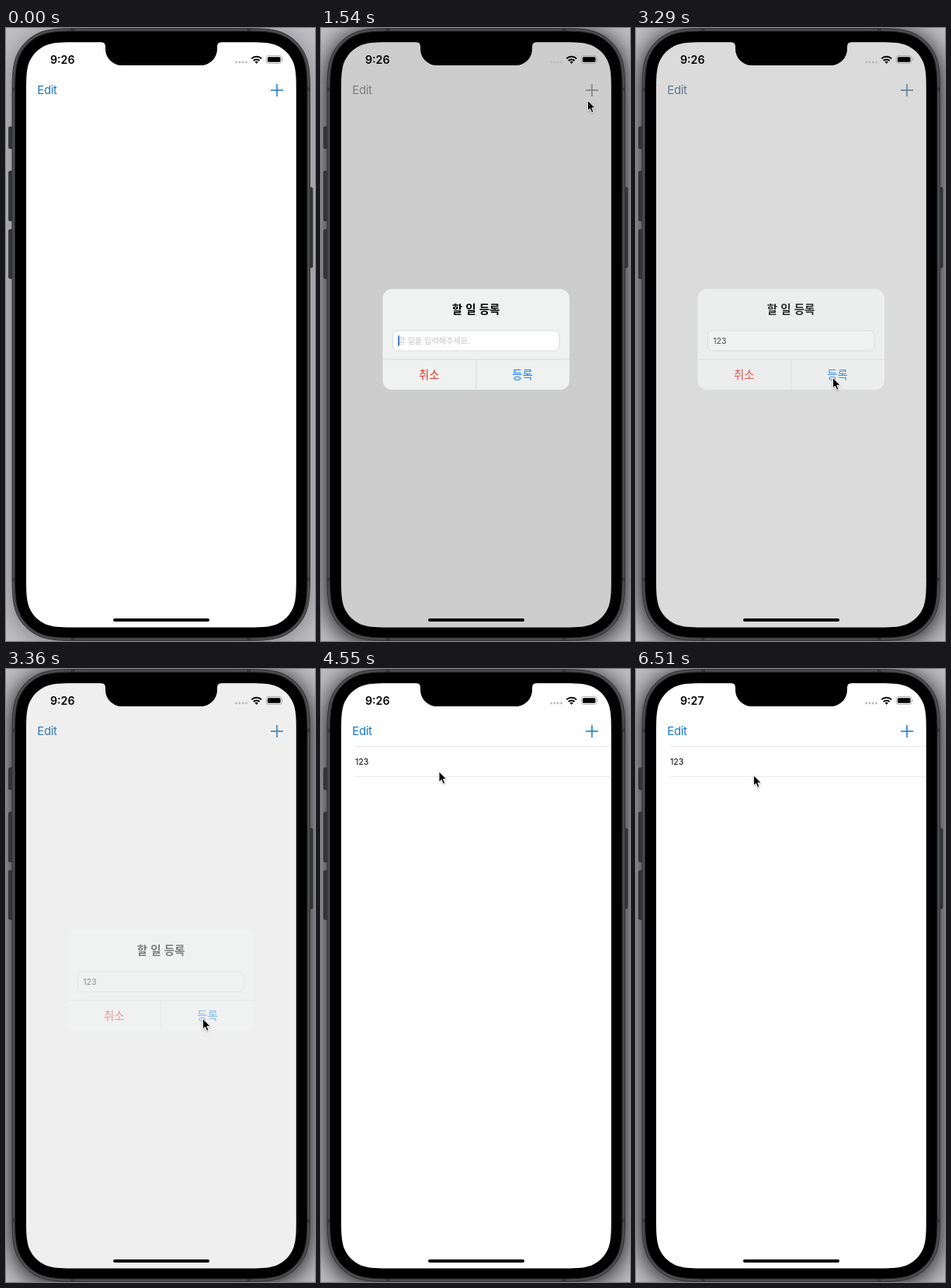
Animation of 398x788 px, one loop 6.58 s. Source, as an HTML page:

```html
<!DOCTYPE html>
<html lang="ko">
<head>
<meta charset="utf-8">
<title>To-do list</title>
<style>
  html, body { margin: 0; height: 100%; overflow: hidden; }
  svg { display: block; width: 398px; height: 788px; background: #c0c0c4; }
  text { font-family: Inter, "Noto Sans CJK KR", "Noto Sans CJK", sans-serif; }
  .ko { font-family: "Noto Sans CJK KR", "Noto Sans CJK", sans-serif; font-size: 14.4px; text-anchor: middle; }
  #shadow { filter: blur(16px); }
  #title { font-size: 14.6px; font-weight: 700; }
  #hint { font-size: 10.2px; text-anchor: start; fill: #c2c3c5; }
  #cursor { filter: drop-shadow(0 1px .8px #0004); }
</style>
</head>
<body>
<svg id="stage" viewBox="0 0 398 788">
  <!-- Device -->
  <path id="shadow"/>
  <g fill="#343537" stroke="#222325" stroke-width=".7">
    <rect x="3.5" y="127" width="6" height="28" rx="1.5"/>
    <rect x="3.5" y="184" width="6" height="64" rx="1.5"/>
    <rect x="3.5" y="259" width="6" height="63" rx="1.5"/>
    <rect x="389" y="205" width="6" height="103" rx="1.5"/>
  </g>
  <path id="body" fill="#4b4c4e" stroke="#303133"/>
  <path d="M8 79h5M387 79h5M8 709h5M387 709h5M86 1v4M313 1v4M86 783v4M313 783v4" stroke="#353638" stroke-width="5"/>
  <path id="bezel" stroke="#2b2c2e"/>
  <path id="screen" fill="#fff"/>
  <path id="dim"/>
  <path d="M122 18Q128 18 128 24V27A21 21 0 0 0 149 48H251A21 21 0 0 0 272 27V24Q272 18 278 18Z"/>
  <rect x="138" y="759" width="124" height="4" rx="2"/>

  <!-- Status bar -->
  <text id="clock" x="57" y="45.7" font-size="14.2" font-weight="600"></text>
  <path d="M296.6 44H309.6" stroke="#b9b9bc" stroke-width="2.8" stroke-linecap="round" stroke-dasharray="0 4.3"/>
  <path d="M316.3 39.4A9 9 0 0 1 329.1 39.4M318.8 42A5.5 5.5 0 0 1 326.6 42" fill="none" stroke="#000" stroke-width="2"/>
  <path d="M322.7 45.9L320.5 43.6Q322.7 41.9 324.9 43.6Z"/>
  <rect x="335.3" y="35.6" width="19.8" height="9.8" rx="2.8" fill="none" stroke="#a4a4a6" stroke-width=".9"/>
  <rect x="336.9" y="37.2" width="16.6" height="6.6" rx="1.5"/>
  <path d="M356.2 39.1Q357.8 40.5 356.2 41.9Z" fill="#a4a4a6"/>

  <!-- List -->
  <text id="edit" x="40.2" y="85.4" font-size="14.9" letter-spacing="-.25">Edit</text>
  <path id="plus" d="M341 80H357M349 72V88" stroke-width="1.5"/>
  <rect id="highlight" x="26" y="99" width="348" height="39.5" fill="#d1d1d5"/>
  <g id="row">
    <path d="M44 99.5H373.5M44 138.5H373.5" stroke="#e9e9eb"/>
    <text x="44" y="123.2" font-size="10.7">123</text>
  </g>
  <path id="check" d="M339.7 119.9L343.6 124.5L351.2 113.8" fill="none" stroke="#1878c9" stroke-width="1.7" stroke-linecap="round" stroke-linejoin="round"/>

  <!-- Alert -->
  <g id="alert">
    <rect id="card" x="79.5" y="335.5" width="240.5" height="129.5" rx="12" fill="#f0f2f2"/>
    <rect id="field" x="92.5" y="389" width="214.5" height="26" rx="6" stroke="#d5d8d8" stroke-width=".9"/>
    <g id="content">
      <path d="M79.5 426H320M199.8 426V465" stroke="#d9dbdb"/>
      <text class="ko" id="title" x="199.6" y="367.2">할 일 등록</text>
      <text class="ko" id="hint" x="99.2" y="405.8">할 일을 입력해주세요.</text>
      <text id="typed" x="99.2" y="406" font-size="10.7" fill="#222"></text>
      <text class="ko" x="139.2" y="451" fill="#e0362c">취소</text>
      <text class="ko" x="259.5" y="451" fill="#167af2">등록</text>
      <rect id="caret" y="395.3" width="1.8" height="13.4" rx=".6" fill="#4470d0"/>
    </g>
  </g>

  <path id="cursor" d="M0 0V13.6L3.1 10.8L5.4 16L7.7 15L5.5 9.9H9.8Z" stroke="#fff"/>
</svg>
<script>
const LOOP = 6580, STEP = 70;
const el = Object.fromEntries([...document.querySelectorAll('[id]')].map(e => [e.id, e]));
const set = (id, attrs) => { for (const k in attrs) el[id].setAttribute(k, attrs[k]); };
const show = (id, alpha) => set(id, { opacity: +alpha });
const ramp = (t, from, to) => Math.min(1, Math.max(0, (t - from) / (to - from)));
const smooth = p => p * p * (3 - 2 * p);
const mix = (a, b, p) => a + (b - a) * p;

// Rectangle with continuous-curvature corners
function squircle(x, y, right, bottom, r) {
  const corner = [[1.529, 0], [1.088, 0], [.868, 0], [.631, .075], [.373, .169],
    [.169, .373], [.075, .631], [0, .868], [0, 1.088], [0, 1.529]];
  const place = (flipX, flipY, points) => points.map(([u, v]) =>
    `${flipX ? right - u * r : x + u * r} ${flipY ? bottom - v * r : y + v * r}`);
  const back = [...corner].reverse();
  const corners = [place(1, 0, corner), place(1, 1, back), place(0, 1, corner), place(0, 0, back)];
  return 'M' + corners.map(([first, ...rest]) => `${first}C${rest.join(' ')}`).join('L') + 'Z';
}

set('shadow', { d: squircle(8, 4, 391.5, 791, 60) });
set('body', { d: squircle(8, .5, 391.5, 787.5, 60) });
set('bezel', { d: squircle(11.5, 4, 388, 784, 56.5) });
for (const id of ['screen', 'dim']) set(id, { d: squircle(26, 18.3, 373.8, 770.5, 43.3) });

// Each move: start, end, x, y, sideways bend
const moves = [
  [70, 790, 348.5, 78.5, 85], [1330, 1400, 343, 92.5], [1540, 2100, 245, 452],
  [2870, 3010, 253, 449], [3990, 4620, 148, 120], [5740, 5810, 147, 122.5], [6370, 6510, 151, 136]
];
function pointer(t) {
  let x = 214, y = 765;
  for (const [start, end, toX, toY, bend = 0] of moves) {
    const p = smooth(ramp(t, start, end));
    x = mix(x, toX, p) + bend * Math.sin(Math.PI * p);
    y = mix(y, toY, p);
  }
  return `${x + .4} ${y + .4}`;
}

const blue = [24, 120, 201], gray = [122, 123, 125];
const tapGlow = (t, start, end) => t < start ? 0 : 1 - ramp(t, start + STEP, end);

function draw(t) {
  show('shadow', t < 1050 ? .35 : 1);
  el.clock.textContent = t < 5390 ? '9:26' : '9:27';

  const enter = ramp(t, 1170, 1480), leave = ramp(t, 3250, 3460);
  const alpha = enter * (1 - leave), leaving = leave > 0;
  const dim = smooth(enter) * (1 - leave) ** 1.5;
  const tint = `rgb(${blue.map((c, i) => Math.round(mix(c, gray[i], dim)))})`;
  show('dim', dim * .196);
  set('edit', { fill: tint });
  set('plus', { stroke: tint });
  show('plus', t < 1050 ? 1 : mix(.3, 1, ramp(t, 1170, 1400)));

  const scale = 1 + .2 * (1 - enter) ** 2;
  set('alert', { transform: `translate(199.7 400.3) scale(${scale}) translate(-199.7 -400.3)` });
  show('card', alpha);
  show('content', alpha);
  show('field', leaving ? t < 3500 : alpha);
  set('field', { fill: leaving ? '#f0f2f1' : '#fff', 'stroke-opacity': alpha });

  const count = Math.floor(3 * ramp(t, 2030, 2660));
  el.typed.textContent = '123'.slice(0, count);
  show('hint', !count);
  set('caret', { x: 99.2 + count * 6.3 });
  show('caret', t < 3150 && (t - 1330) % 1000 < 550);

  show('row', ramp(t, 3500, 3710));
  show('highlight', tapGlow(t, 4830, 5250) + tapGlow(t, 5950, 6230));
  show('check', t >= 4900 && t < 6020);

  show('cursor', t >= 70);
  set('cursor', { transform: `translate(${pointer(t)})` });
}

const start = performance.now();
function tick() {
  const t = (performance.now() - start) % LOOP;
  draw(Math.floor(t / STEP) * STEP);
  requestAnimationFrame(tick);
}
tick();
</script>
</body>
</html>
```
